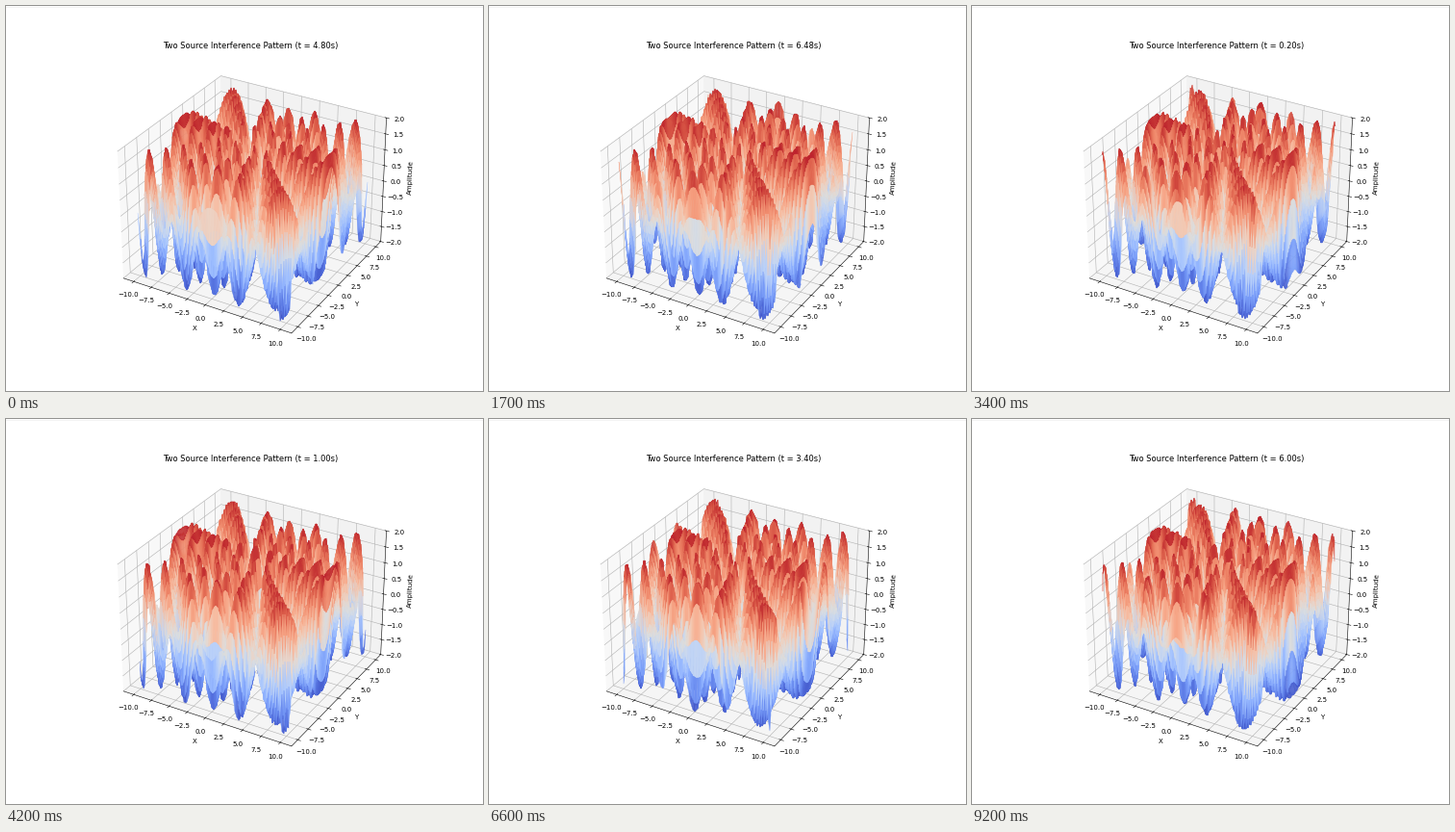
Write a matplotlib script that moves like this. It is 496 by 400 pixels and loops after 9300 ms.

```python
import numpy as np
import matplotlib.pyplot as plt
from matplotlib.animation import FuncAnimation
from mpl_toolkits.mplot3d import proj3d

WIDTH, HEIGHT = 496, 400
FRAMES, INTERVAL = 93, 100
CELLS = 100
SOURCES = ((-3, 0), (3, 0))
WAVELENGTH = 2.0
FREQUENCY = 0.5
TIME_STEP = 0.04
CYCLE_STEPS = 200     # the clock wraps after 8 s
START_STEP = 120
REACH = 11 * 25 / 24  # data half-width plus margins

plt.rcParams["font.family"] = "DejaVu Sans"

fig = plt.figure(figsize=(9.92, 8), dpi=50, facecolor="white")
left, top, size = 98.7, 48.5, 311
box = fig.add_axes([left / WIDTH, 1 - (top + size) / HEIGHT,
                    size / WIDTH, size / HEIGHT], projection="3d")
box.set_xlim(-REACH, REACH, view_margin=0)
box.set_ylim(-REACH, REACH, view_margin=0)
box.set_zlim(-2, 2, view_margin=0)
box.set_xlabel("X")
box.set_ylabel("Y")
box.set_zlabel("Amplitude")
title = box.set_title("")

# The surface is painted on a flat overlay, ordered from back to front.
layer = fig.add_axes([0, 0, 1, 1])
layer.set_xlim(0, 1)
layer.set_ylim(0, 1)
layer.axis("off")
layer.plot([0, 1], [0.9985, 0.9985], color="0.94", lw=1)

fig.canvas.draw()
side = np.linspace(-10, 10, CELLS + 1)
X, Y = np.meshgrid(side, side[::-1])
RADII = [np.hypot(X - sx, Y - sy) for sx, sy in SOURCES]
mesh = None


def clock(i):
    step = START_STEP + (5 * i) // 2
    return (step % CYCLE_STEPS) * TIME_STEP


def height(t):
    return sum(np.cos(2 * np.pi * (r / WAVELENGTH - FREQUENCY * t))
               for r in RADII)


def project(z):
    """Place surface points in figure fractions."""
    px, py, _ = proj3d.proj_transform(X.ravel(), Y.ravel(), z.ravel(),
                                      box.get_proj())
    pixels = box.transData.transform(np.column_stack([px, py]))
    spots = fig.transFigure.inverted().transform(pixels)
    return spots[:, 0].reshape(X.shape), spots[:, 1].reshape(X.shape)


def draw(i):
    global mesh
    t = clock(i)
    z = height(t)
    u, v = project(z)
    level = (z[:-1, :-1] + z[1:, :-1] + z[:-1, 1:] + z[1:, 1:]) / 4
    if mesh is not None:
        mesh.remove()
    mesh = layer.pcolormesh(u, v, level, cmap="coolwarm", vmin=-2, vmax=2,
                            shading="flat", antialiased=True,
                            edgecolors="face", linewidth=0.5)
    title.set_text(f"Two Source Interference Pattern (t = {t:.2f}s)")
    return mesh, title


anim = FuncAnimation(fig, draw, frames=FRAMES, interval=INTERVAL,
                     repeat=True, repeat_delay=0, blit=False)
plt.show()
```
